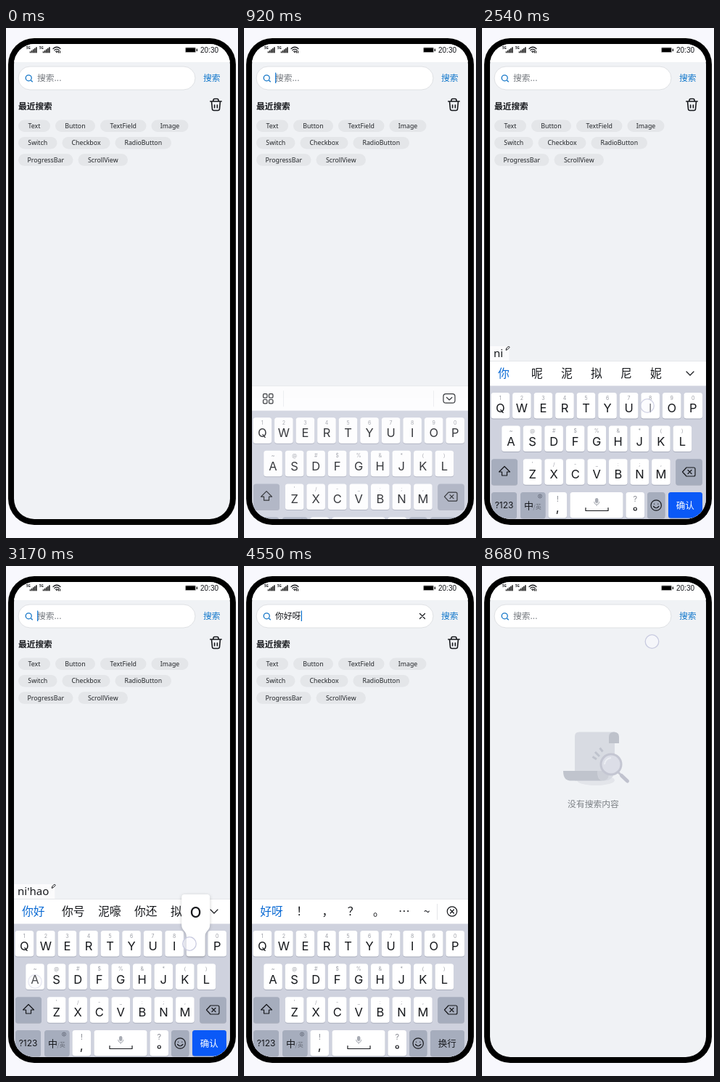
Write an HTML page that moves like this. It is 320 px wide and 702 px high and loops after 8710 ms.

```html
<!DOCTYPE html>
<html lang="zh">
<head>
<meta charset="utf-8">
<style>
  html, body { margin: 0; width: 100%; height: 100%; overflow: hidden; background: #f8f8fd; }
  svg { display: block; width: 100%; height: 100%; }
  text { font-family: "Noto Sans", "Noto Sans CJK SC", "Noto Sans CJK", sans-serif; white-space: pre; }
  .key { font-family: Inter, "Noto Sans CJK SC", "Noto Sans CJK", sans-serif; }
  .cjk { font-family: "Noto Sans CJK SC", "Noto Sans CJK", sans-serif; }
  .clock { font-family: "Liberation Sans", sans-serif; }
  .line { fill: none; stroke: #16181c; stroke-width: 1.2; stroke-linecap: round; stroke-linejoin: round; }
  #popup { filter: drop-shadow(0 1px 2px #0003); }
</style>
</head>
<body>
<svg id="stage" viewBox="0 0 320 702">
  <defs><clipPath id="glass"><rect x="11" y="22" width="298" height="654" rx="28"/></clipPath></defs>
  <rect width="320" height="702" fill="#f8f8fd"/>
  <rect x="3" y="14" width="314" height="670" rx="36"/>
  <g clip-path="url(#glass)">
    <rect x="11" y="22" width="298" height="654" fill="#f0f2f5"/>
    <rect x="11" y="22" width="298" height="25" fill="#fff"/>
    <g id="status">
      <path class="line" d="M65 28.500q5-4.500 10 0M66.800 30.500q3.200-2.800 6.400 0M68.600 32.400q1.400-1.200 2.800 0"/>
      <path d="M69 33h2l-1 1.500zM72 31.500h1v3h-1zM74 31.500h1v3h-1z"/>
      <rect x="247" y="26.500" width="15" height="7.500" rx="1.500" fill="#aaa"/>
      <rect x="248" y="27.500" width="13" height="5.500" rx=".6"/>
      <rect x="262.700" y="28.500" width="1.300" height="3.500" rx=".5"/>
    </g>
    <g id="field">
      <rect x="17" y="53" width="244" height="32" rx="16" fill="#fff" stroke="#d9dbdf" stroke-width=".8"/>
      <path d="M34.400 72l2.300 2.300" stroke="#1677c8" stroke-width="1.300"/>
      <circle cx="31.200" cy="68.800" r="4" fill="none" stroke="#1677c8" stroke-width="1.300"/>
      <path id="clear" class="line" d="M242.500 65.500l7 7m0-7l-7 7"/>
    </g>
    <rect id="caret" x="43" y="61.500" width="1.300" height="14.500" fill="#1677d0"/>
    <g id="recent">
      <path class="line" style="stroke-width:1.600" d="M281.800 101h15.400M285.800 100.500q0-3 2-3h3.400q2 0 2 3M283.500 101l1 10.500q.2 2 2.200 2h5.600q2 0 2.200-2l1-10.500M287.600 106v3.800M291.400 106v3.800"/>
    </g>
    <g id="chipsA"></g>
    <g id="chipsB"></g>
    <g id="empty">
      <ellipse cx="157" cy="295" rx="26" ry="7" fill="#e3e5ea"/>
      <path d="M134 228.500h49v53q-2 14-14 14h-41v-61q0-6 6-6z" fill="#d8dbe2"/>
      <path d="M175 244v-9q0-6.500 7-6.500t7 6.500v9z" fill="#bec2cb"/>
      <path d="M112 282h47.500q-1 13 7.500 13.500h-46q-9-1-9-13.500z" fill="#c0c4cd"/>
      <path d="M159.500 282h12l3.500 5q-1 8.500-8 8.500-7.500 0-7.500-13.500z" fill="#cdd0d8"/>
      <path d="M152.500 262.500l5.500 3.500m-2-10l6 6m.5-11.500l4 5" stroke="#bfc3cd" stroke-width="3" fill="none"/>
      <path d="M187 283l5 5" stroke="#c4c6d1" stroke-width="3"/>
      <path d="M192.500 288.500l8 7.500" stroke="#c0c2ce" stroke-width="5" stroke-linecap="round"/>
      <circle cx="178" cy="273" r="14" fill="#dcdee7" stroke="#c4c6d2" stroke-width="3"/>
      <path d="M169 273q1-8 9-9" fill="none" stroke="#eceef3" stroke-width="2"/>
    </g>
    <g id="keyboard">
      <g id="strip"><rect id="stripBox" x="11" y="438" height="21" fill="#fbfbfc"/><path id="pen" class="line" style="stroke-width:1" d="M0 443l.5-2 3-3 1.500 1.500-3 3z"/></g>
      <rect x="11" y="458" width="298" height="35" fill="#fff"/>
      <path d="M11 458.500h298" stroke="#dfe1e5" stroke-width=".8"/>
      <rect x="11" y="492.500" width="298" height="184" fill="#cfd2de"/>
      <g id="tools">
        <g class="line" id="grid"></g>
        <path d="M54.500 465v22M261.500 465v22" stroke="#eceef0"/>
        <path class="line" d="M278.500 469.500h9q3.500 0 3.500 3.500v5.500q0 3.500-3.500 3.500h-9q-3.500 0-3.500-3.500v-5.500q0-3.500 3.500-3.500zM279.500 474.300l3.700 3.500 3.700-3.500"/>
      </g>
      <g id="options"></g>
      <path id="more" class="line" d="M282 473l5 5 5-5"/>
      <g id="close"><path d="M266.500 465v22" stroke="#e4e6e9"/><circle class="line" cx="287" cy="475.500" r="6.700"/><path class="line" d="M284.500 473l5 5m0-5l-5 5"/></g>
      <g id="keys"></g>
      <g id="confirm"></g>
      <g id="popup"><path fill="#fff" d="M-19.500-46q0-4 4-4h31q4 0 4 4v38c0 8-6.700 8-6.700 16v24q0 3-3 3h-19.600q-3 0-3-3v-24c0-8-6.700-8-6.700-16z"/></g>
    </g>
    <circle id="touch0" r="9.300"/>
    <circle id="touch1" r="9.300"/>
  </g>
</svg>
<script>
const LOOP = 8710;
const INK = '#16181c', BLUE = '#0a6ad4';
const $ = id => document.getElementById(id);

function add(parent, tag, attrs, content) {
  const node = document.createElementNS('http://www.w3.org/2000/svg', tag);
  for (const name in attrs) node.setAttribute(name, attrs[name]);
  if (content) node.textContent = content;
  return parent.appendChild(node);
}
// y is the visual middle of the text
function label(parent, x, y, size, content, extra = {}) {
  return add(parent, 'text', { x, y: y + size * .365, 'font-size': size, fill: INK, ...extra }, content);
}
const mid = { 'text-anchor': 'middle' };
const show = (node, on) => { node.style.display = on ? '' : 'none'; };

// Status bar
for (const x of [28, 46]) {
  label($('status'), x, 27.5, 4.5, '5G', { 'font-weight': 700 });
  for (let i = 0; i < 5; i++) {
    const h = 2 + i * 1.5;
    add($('status'), 'rect', { x: x + 4.8 + i * 2.1, y: 34.3 - h, width: 1.4, height: h });
  }
}
label($('status'), 268, 30, 10, '20:30', { class: 'clock' });

// Search bar and history
const hint = label($('field'), 43, 69, 11.8, '搜索...', { class: 'cjk', fill: '#777b80' });
const typed = label($('field'), 43, 69, 11.8, '', { class: 'cjk' });
label($('field'), 272, 69, 11.8, '搜索', { class: 'cjk', fill: '#1479cc', 'font-weight': 500 });
label($('recent'), 17, 108, 11.7, '最近搜索', { class: 'cjk', 'font-weight': 700 });
label($('empty'), 153.5, 328, 11.8, '没有搜索内容', { class: 'cjk', fill: '#7e8287', ...mid });

const history = [['Text', 44], ['Button', 55], ['TextField', 63.5], ['Image', 51], ['Switch', 53.5],
  ['Checkbox', 66], ['RadioButton', 77.5], ['ProgressBar', 75.5], ['ScrollView', 68.5]];
function layChips(group, items) {
  let x = 17, y = 126.5;
  for (const [name, width] of items) {
    if (x + width > 295) { x = 17; y += 23.4; }
    add(group, 'rect', { x, y, width, height: 16.5, rx: 8.25, fill: '#e4e6e9' });
    label(group, x + width / 2, y + 8.2, 8.8, name, { fill: '#222529', ...mid });
    x += width + 7;
  }
}
layChips($('chipsA'), history);
layChips($('chipsB'), [['你好呀', 52], ...history]);

// Keyboard
for (const x of [26.5, 34.5]) for (const y of [469.5, 477.3])
  add($('grid'), 'rect', { x, y, width: 5.4, height: 5.4, rx: 1.3 });

const spots = {};
const keys = $('keys');
function cap(x, y, width, fill = '#fff', parent = keys) {
  add(parent, 'rect', { x, y: y + 1, width, height: 35.5, rx: 3.5, fill: '#a9adbc' });
  add(parent, 'rect', { x, y, width, height: 35.5, rx: 3.5, fill });
}
function keyRow(letters, marks, left, y) {
  [...letters].forEach((letter, i) => {
    const x = left + i * 29.55;
    spots[letter] = [x, y];
    cap(x - 12.8, y, 25.6);
    label(keys, x, y + 7, 7, marks[i], { class: 'key', fill: '#9a9da5', ...mid });
    label(keys, x, y + 21, 16.5, letter, { class: 'key', ...mid });
  });
}
keyRow('QWERTYUIOP', '1234567890', 25.3, 502);
keyRow('ASDFGHJKL', '~@#$%&*()', 40, 547.5);
keyRow('ZXCVBNM', "'/-_:;,", 69.6, 593.3);
const DARK = '#a6adbd';
cap(13, 593.3, 36, DARK);
cap(267.300, 593.3, 36.500, DARK);
add(keys, 'path', { class: 'line', d: 'M31 603.500l7.500 7.500h-4v5h-7v-5h-4z' });
add(keys, 'path', { class: 'line', d: 'M282 605h10q2 0 2 2v8q0 2-2 2h-10l-5.500-6zM284 608.500l5 5m0-5l-5 5' });
const BASE = 639;
[[13, 35, DARK], [53, 34.5, DARK], [91.500, 25.500], [121.500, 73], [198.500, 25.500], [228, 24.500, DARK], [257, 47, DARK]]
  .forEach(([x, width, fill]) => cap(x, BASE, width, fill));
label(keys, 30.5, 657, 12, '?123', { class: 'key', ...mid });
label(keys, 58, 657, 13, '中', { class: 'cjk', 'font-weight': 500 });
label(keys, 70.500, 659, 8, '/英', { class: 'cjk', fill: '#6b707c' });
add(keys, 'circle', { cx: 80, cy: 644.5, r: 2.5, fill: 'none', stroke: '#5d6270', 'stroke-width': .8 });
add(keys, 'circle', { cx: 80, cy: 644.5, r: .9, fill: '#5d6270' });
label(keys, 104.3, 648, 11, '!', { class: 'key', fill: '#888b93', ...mid });
label(keys, 104.3, 660, 17, ',', { class: 'key', ...mid });
label(keys, 211.3, 648, 11, '?', { class: 'key', fill: '#888b93', ...mid });
add(keys, 'circle', { class: 'line', cx: 211.3, cy: 662, r: 2 });
add(keys, 'path', { class: 'line', d: 'M143 660.500v4h31v-4' });
add(keys, 'rect', { x: 156, y: 647, width: 4.4, height: 7, rx: 2.2, fill: '#a8abb3' });
add(keys, 'path', { d: 'M154.500 652q.5 4 3.700 4t3.700-4M158.200 656v2', fill: 'none', stroke: '#a8abb3' });
add(keys, 'circle', { class: 'line', cx: 240.2, cy: 657, r: 7.2 });
add(keys, 'path', { class: 'line', d: 'M237.600 655v.2M242.800 655v.2M236.500 658.500q3.700 4.500 7.400 0' });
label(keys, 280.3, 657, 12.5, '换行', { class: 'cjk', ...mid });
cap(257, BASE, 47, '#0a59f7', $('confirm'));
label($('confirm'), 280.3, 657, 12.5, '确认', { class: 'cjk', fill: '#fff', ...mid });
const bubble = label($('popup'), 0, -25, 20.5, '', { class: 'key', 'font-weight': 500, ...mid });
const pinyin = label($('strip'), 16, 448, 15, '');

// [start, pinyin, candidates, committed text]
const steps = [
  [0, '', '', ''],
  [1980, 'n', '你 那 年 能 呢 女', ''],
  [2380, 'ni', '你 呢 泥 拟 尼 妮', ''],
  [2770, "ni'h", '你好 你和 你会 你还 拟好', ''],
  [2990, "ni'ha", '你好 你还 你哈 泥蒿 拟好', ''],
  [3130, "ni'hao", '你好 你号 泥嚎 你还 拟', ''],
  [3940, '', '呀 ！ ， ？ 。 … ~', '你好'],
  [4190, '', '好呀 ！ ， ？ 。 … ~', '你好呀'],
  [5010, '', '', '你好呀'],
  [6200, '', '', '']
];
function layOptions(words, composing) {
  $('options').replaceChildren();
  words.forEach((word, i) => {
    const fill = i ? INK : BLUE;
    if (composing) {
      const pitch = word.length > 1 || words[0].length > 1 ? 50 : 41;
      label($('options'), i ? 27 + i * pitch : 22, 475.5, 15.8, word, { class: 'cjk', fill });
    } else {
      const x = i ? 45 + i * 35.2 - (i === 6 ? 4 : 0) : 38;
      label($('options'), x, 475.5, 15.8, word, { class: 'cjk', fill, ...mid });
    }
  });
}

// [down, up, x, y, letter]
const taps = [
  [590, 770, 201.5, 65],
  [1950, 2160, 219, 613, 'N'],
  [2350, 2520, 228, 520, 'I'],
  [2740, 2900, 187, 569, 'H'],
  [2960, 3100, 40, 572, 'A'],
  [3105, 3420, 253, 520, 'O'],
  [3630, 3940, 38, 475],
  [4050, 4160, 38, 475],
  [4880, 5010, 287, 475],
  [5350, 5450, 283, 475],
  [5870, 6200, 284, 68],
  [7560, 7700, 289, 106],
  [8610, 8710, 234.5, 104]
];
const FADE = 130;
const caretOn = [[680, 1265], [1765, 2255], [2745, 3235], [3580, 4060], [4540, 5030], [5520, 6000],
  [6200, 6720], [7210, 7700], [8200, 8640]];

const clamp = v => Math.min(1, Math.max(0, v));
const between = (t, [a, b]) => t >= a && t < b;
const easeOut = v => 1 - (1 - clamp(v)) ** 2;
let current = -1;

function applyStep(index) {
  current = index;
  const [, spelling, words, text] = steps[index];
  pinyin.textContent = spelling;
  typed.textContent = text;
  show($('strip'), spelling);
  show($('confirm'), spelling);
  show($('more'), spelling);
  show($('close'), words && !spelling);
  show($('tools'), !words);
  show(hint, !text);
  show($('clear'), text);
  layOptions(words ? words.split(' ') : [], spelling);
  $('caret').setAttribute('x', 43 + text.length * 11.9);
}

function draw(t) {
  const rise = t < 3000 ? easeOut((t - 770) / 250) : 1 - clamp((t - 5390) / 190) ** 1.6;
  show($('keyboard'), rise > 0);
  $('keyboard').setAttribute('transform', `translate(0 ${218 * (1 - rise)})`);
  $('keyboard').setAttribute('opacity', rise);

  const index = steps.findLastIndex(step => t >= step[0]);
  if (index !== current) applyStep(index);
  if (steps[index][1]) {
    const end = 16 + pinyin.getComputedTextLength();
    $('stripBox').setAttribute('width', end - 3);
    $('pen').setAttribute('transform', `translate(${end + 4} 0)`);
  }

  show($('caret'), caretOn.some(span => between(t, span)));
  const cleared = t >= 7690;
  show($('recent'), !cleared);
  show($('chipsA'), t < 6200);
  show($('chipsB'), t >= 6200 && !cleared);
  show($('empty'), cleared);

  const press = taps.find(tap => tap[4] && between(t, tap));
  show($('popup'), press);
  if (press) {
    bubble.textContent = press[4];
    $('popup').setAttribute('transform', `translate(${spots[press[4]]})`);
  }

  const active = taps.filter(([down, up]) => t >= down && t < up + FADE);
  [0, 1].forEach(i => {
    const tap = active[i], ring = $('touch' + i);
    show(ring, tap);
    if (!tap) return;
    const [down, up, x, y] = tap;
    const attrs = { cx: x, cy: y, fill: '#fafaff', 'fill-opacity': .55, stroke: '#c9cbe0', 'stroke-width': 1.3,
      opacity: clamp((t - down + 25) / 70) * (1 - clamp((t - up) / FADE)) };
    for (const name in attrs) ring.setAttribute(name, attrs[name]);
  });
}

const start = performance.now();
function frame() {
  draw((performance.now() - start) % LOOP);
  requestAnimationFrame(frame);
}
frame();
</script>
</body>
</html>
```
